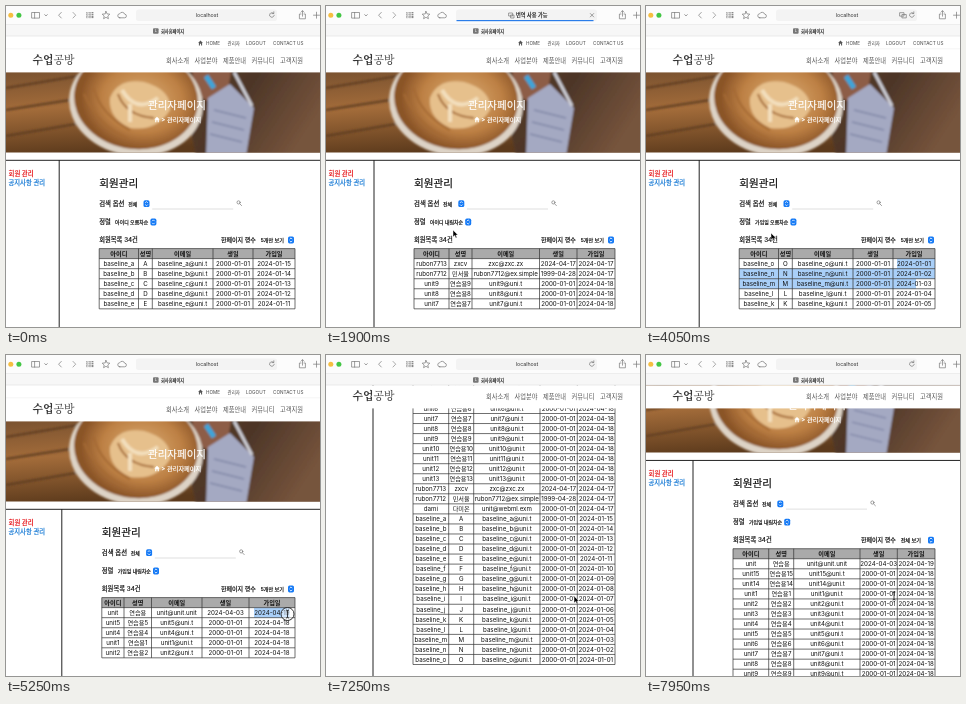
These frames come from a looping animation (314 by 321 pixels, 8 s). An HTML page:

```html
<!DOCTYPE html>
<html lang="ko">
<head>
<meta charset="utf-8">
<title>회원관리</title>
<style>
html, body { margin: 0; width: 100%; height: 100%; overflow: hidden; background: #fff; }
svg { display: block; width: 314px; height: 321px; }
text { font-family: Inter, "Noto Sans CJK KR", "Noto Sans CJK", sans-serif; white-space: pre; stroke-width: 0; }
.medium { stroke-width: .2px; }
.logo { font-family: "Noto Serif CJK KR", "Noto Sans CJK KR", serif; }
.icon { fill: none; stroke: #777; stroke-width: .7; stroke-linecap: round; stroke-linejoin: round; }
</style>
</head>
<body>
<svg viewBox="0 0 314 321">
  <defs>
    <clipPath id="heroClip"><rect y="66" width="314" height="80.5"/></clipPath>
    <linearGradient id="wood" x2=".25" y2="1">
      <stop stop-color="#7a5230"/><stop offset=".45" stop-color="#a36c3a"/><stop offset="1" stop-color="#5c3a1c"/>
    </linearGradient>
    <linearGradient id="desk" x2="1" y2=".4">
      <stop stop-color="#5a3a24"/><stop offset=".5" stop-color="#4d3628"/><stop offset="1" stop-color="#76543c"/>
    </linearGradient>
    <radialGradient id="coffee" cx=".55" cy=".5">
      <stop stop-color="#dcae74"/><stop offset=".65" stop-color="#bd8044"/><stop offset="1" stop-color="#8a5427"/>
    </radialGradient>
    <filter id="soft"><feGaussianBlur stdDeviation="1.2"/></filter>
  </defs>
  <rect width="314" height="321" fill="#fff"/>
  <g id="page">
    <g id="topNav"></g>
    <g id="hero" clip-path="url(#heroClip)">
      <rect y="66" width="314" height="81" fill="url(#wood)"/>
      <g filter="url(#soft)">
        <path d="M0 82L72 70M0 104L64 94M0 130L70 118" stroke="#5d3c20" stroke-width="2"/>
        <path d="M172 60H320V150H190Z" fill="url(#desk)"/>
        <path d="M186 60H226L222 84 204 96 188 88Z" fill="#8d5d47"/>
        <path d="M202 92L224 78 248 102 240 150H200Z" fill="#a4a9c2"/>
        <path d="M208 104L240 112M206 116L238 124M204 128L236 136" stroke="#7f86a6" stroke-width="1.5"/>
        <path d="M200 70L208 82" stroke="#3ea5da" stroke-width="5"/>
        <path d="M228 66L246 100" stroke="#cfd0d8" stroke-width="3"/>
        <ellipse cx="130" cy="97" rx="67" ry="53" fill="#ddd3c6" transform="rotate(6 130 97)"/>
        <ellipse cx="130" cy="93" rx="62" ry="50" fill="url(#coffee)" transform="rotate(6 130 93)"/>
        <path d="M104 92Q112 72 138 76 166 84 164 104 150 126 124 122 102 112 104 92Z" fill="#e6c08c"/>
        <path d="M78 88Q90 118 122 132M88 82Q94 108 124 124M112 88Q120 110 148 112" fill="none" stroke="#a56a34" stroke-width="2"/>
        <path d="M116 84Q130 108 152 92M124 98V116" fill="none" stroke="#f3dfbd" stroke-width="4"/>
      </g>
    </g>
    <g id="heroText"></g>
    <g id="sideNav"></g>
    <g id="views"></g>
  </g>
  <g id="header"></g>
  <g id="browser"></g>
  <g id="pointer">
    <circle id="ring" r="6.5" fill="#fff" fill-opacity=".45" stroke="#222" stroke-width=".9"/>
    <path id="arrow" d="M0 0V7L1.7 5.5 2.8 8 4 7.5 2.9 5.1H5Z" fill="#000" stroke="#fff" stroke-width=".5"/>
    <path id="beam" d="M-1.4-4Q0-4 0-3 0-4 1.4-4M0-3V3M-1.4 4Q0 4 0 3 0 4 1.4 4" fill="none" stroke="#111" stroke-width=".8"/>
  </g>
</svg>
<script>
const LOOP = 8000, RIGHT = 289, TABLE_TOP = 242.6, ROW = 10.04;
const $ = id => document.getElementById(id);

// Text placed by its vertical centre.
const text = (s, x, y, size, fill = '#111', extra = '') =>
  `<text x="${x}" y="${y + size * .36}" font-size="${size}" fill="${fill}" stroke="${fill}" ${extra}>${s}</text>`;
const mid = 'text-anchor="middle"', medium = 'class="medium"';
const line = (x1, y1, x2, y2, color = '#333', w = .7) =>
  `<path d="M${x1} ${y1}L${x2} ${y2}" stroke="${color}" stroke-width="${w}"/>`;
const icon = (d, extra = '') => `<path class="icon" d="${d}" ${extra}/>`;
const house = (x, y, s, fill) =>
  `<path transform="translate(${x} ${y}) scale(${s})" d="M-3 0L0-3 3 0H2V3H.7V.8H-.7V3H-2V0Z" fill="${fill}"/>`;
const stepper = (x, y) =>
  `<rect x="${x - 3}" y="${y - 3.4}" width="6" height="6.8" rx="1.6" fill="#1479f5"/>
   <path d="M${x - 1.3} ${y - .8}l1.3-1.3 1.3 1.3M${x - 1.3} ${y + .8}l1.3 1.3 1.3-1.3" fill="none" stroke="#fff" stroke-width=".8"/>`;

const unit = (n, birth = '2000-01-01', joined = '2024-04-18') =>
  ['unit' + n, '연습용' + n, `unit${n}@uni.t`, birth, joined];
const firstUnit = ['unit', '연습용', 'unit@unit.unit', '2024-04-03', '2024-04-19'];
const letter = i => {
  const c = String.fromCharCode(97 + i), id = 'baseline_' + c;
  return [id, c.toUpperCase(), id + '@uni.t', '2000-01-01', '2024-01-' + String(15 - i).padStart(2, '0')];
};
const range = n => [...Array(n).keys()];
const guests = [
  ['rubon7713', 'zxcv', 'zxc@zxc.zx', '2024-04-17', '2024-04-17'],
  ['rubon7712', '민서율', 'rubon7712@ex.simple', '1999-04-28', '2024-04-17'],
];
const letters = range(15).map(letter);
const everyone = [firstUnit, unit(15), unit(14), ...range(13).map(i => unit(i + 1)), ...guests,
  ['dami', '다미온', 'unit@webml.exm', '2000-01-01', '2024-04-17'], ...letters];

const wide = [93.2, 132.5, 146.3, 207, 247, RIGHT];
const narrow = [95.8, 118, 145.5, 196, 243, RIGHT];
const views = [
  { at: 0, cols: wide, sort: '아이디 오름차순', count: '5개만 보기', rows: letters.slice(0, 5) },
  { at: 1700, cols: [88, 123, 146, 213.5, 251, RIGHT], sort: '아이디 내림차순', count: '5개만 보기',
    rows: [...guests, unit(9), unit(8), unit(7)] },
  { at: 2950, cols: wide, sort: '가입일 오름차순', count: '5개만 보기', rows: letters.slice(10).reverse() },
  { at: 4600, cols: narrow, sort: '가입일 내림차순', count: '5개만 보기',
    rows: [firstUnit, ...[5, 4, 1, 2].map(n => unit(n))] },
  { at: 6250, cols: narrow, sort: '가입일 내림차순', count: '10개 보기',
    rows: [firstUnit, ...[10, 9, 1, 2, 3, 4, 5, 6, 7].map(n => unit(n))] },
  { at: 6920, cols: [87, 122.7, 147.7, 214, 251.3, RIGHT], sort: '가입일 내림차순', count: '전체 보기', rows: everyone },
];
const loads = [[1650, 2050], [2850, 3150], [4500, 4750], [6150, 6400], [6800, 7050]];
const notices = [[1850, 2350], [3050, 3450]];
const drags = [
  { view: 2, from: 3550, to: 3800, x: 251 },
  { view: 3, from: 5100, to: 5450, x: 248 },
];

function tableMarkup({ cols, rows }) {
  const bottom = TABLE_TOP + ROW * (rows.length + 1);
  const cells = (row, r, extra) => row.map((s, c) =>
    text(s, (cols[c] + cols[c + 1]) / 2, TABLE_TOP + ROW * (r + .5), 6.2, '#111', mid + extra)).join('');
  return `<rect x="${cols[0]}" y="${TABLE_TOP}" width="${RIGHT - cols[0]}" height="${ROW}" fill="#aaa"/>
    <g class="selection" fill="#a9cff8"></g>` +
    range(rows.length + 2).map(r => line(cols[0], TABLE_TOP + ROW * r, RIGHT, TABLE_TOP + ROW * r)).join('') +
    cols.map(x => line(x, TABLE_TOP, x, bottom)).join('') +
    cells(['아이디', '성명', '이메일', '생일', '가입일'], 0, ' font-weight="600"') +
    rows.map((row, i) => cells(row, i + 1, '')).join('');
}

function viewMarkup(view) {
  const x = view.cols[0];
  return line(x - 40, 154, x - 40, 620, '#222', 1) +
    text('회원관리', x, 177, 10.6, '#111', medium) +
    text('검색 옵션', x, 197.5, 6.4, '#111', medium) +
    text('전체', x + 29, 197.8, 4.9, '#111', medium) + stepper(x + 47.3, 197.7) +
    line(x + 53, 203, x + 134, 203, '#ccc', .6) +
    icon(`M${x + 140.6} 197.8l1.8 1.8`) + `<circle class="icon" cx="${x + 139.4}" cy="196.4" r="1.6"/>` +
    text('정렬', x, 216, 6.3, '#111', medium) +
    text(view.sort, x + 15.9, 216.2, 4.95, '#111', medium) + stepper(x + 54.2, 216) +
    text('회원목록 34건', x, 234, 6.3, '#111', medium) + text('한페이지 행수', 215, 234, 6, '#111', medium) +
    '<rect class="focus" x="252" y="229.5" width="37" height="8.6" rx="2" fill="#fff" stroke="#7db2f5" stroke-width="1.4"/>' +
    `<g class="count">${text(view.count, 254.7, 234.1, 5.1, '#111', medium)}</g>` +
    stepper(285, 234) + tableMarkup(view);
}

$('topNav').innerHTML = house(194.5, 37, .8, '#555') + text('HOME', 200, 37, 4.7, '#444') +
  text('관리자', 221.5, 37, 4.5, '#444') + text('LOGOUT', 240, 37, 4.7, '#444') +
  text('CONTACT US', 267, 37, 4.7, '#444') + line(0, 43, 314, 43, '#e8e8e8', .6);
$('heroText').innerHTML = text('관리자페이지', 171, 99, 10.5, '#fff', mid + ' ' + medium) +
  house(151, 113.5, .9, '#fff') + text('&gt; 관리자페이지', 155.2, 113.5, 6.2, '#fff', medium);
$('sideNav').innerHTML = line(0, 154.3, 314, 154.3, '#222', 1) +
  text('회원 관리', 2.5, 167.2, 6.4, '#e8262a', 'font-weight="600"') +
  text('공지사항 관리', 2.5, 177.1, 6.3, '#1478d4', medium);
$('views').innerHTML = views.map(v => `<g>${viewMarkup(v)}</g>`).join('');
$('header').innerHTML = '<rect y="43.4" width="314" height="23" fill="#fff"/>' +
  text('<tspan font-weight="700">수업</tspan><tspan>공방</tspan>', 26.5, 54.5, 10.9, '#333', 'class="logo"') +
  ['회사소개', '사업분야', '제품안내', '커뮤니티', '고객지원']
    .map((s, i) => text(s, 160 + 28.5 * i, 54.5, 6.25, '#555')).join('');

$('browser').innerHTML =
  '<rect width="314" height="30" fill="#fcfcfc"/><rect y="18.5" width="314" height="11.5" fill="#f7f7f7"/>' +
  line(0, 18.5, 314, 18.5, '#e6e6e6', .6) + line(0, 30, 314, 30, '#ddd', .6) +
  '<circle cx="4.8" cy="9.2" r="2.5" fill="#f6be40"/><circle cx="12.9" cy="9.2" r="2.5" fill="#43c645"/>' +
  icon('M26 6.5h7.5v5.6H26ZM28.6 6.5v5.6M38.7 8.6l1.3 1.4 1.3-1.4M55.3 6.4L52.6 9.2 55.3 12') +
  icon('M67 6.4L69.7 9.2 67 12', 'style="stroke:#888"') +
  range(9).map(i => `<rect x="${80.6 + i % 3 * 2.6}" y="${6.2 + Math.floor(i / 3) * 2.2}" width="1.7" height="1.3" fill="none" stroke="#888" stroke-width=".4"/>`).join('') +
  icon('M100 5.4l1.1 2.5 2.7.3-2 1.8.6 2.7-2.4-1.4-2.4 1.4.6-2.7-2-1.8 2.7-.3Z') +
  icon('M113.8 11.8h4.7a1.8 1.8 0 0 0 .2-3.6 2.7 2.7 0 0 0-5-.4 2 2 0 0 0 .1 4Z') +
  '<rect x="130" y="3.5" width="141" height="11.6" rx="2.5" fill="#f3f3f3"/>' +
  `<g id="address">${text('localhost', 201, 9.3, 5.3, '#333', mid)}</g>` +
  `<g id="notice">${text('번역 사용 가능', 190, 9.3, 5.2, '#222', medium)}${icon('M183 7h3.6v3H183ZM185 9h3v3h-3Z')}</g>` +
  `<g id="translate">${icon('M254 6.7h4v3.4h-4ZM256.3 8.5h4v3.4h-4Z')}</g>` +
  `<g id="reload">${icon('M267.5 7.3a2.3 2.3 0 1 0 .7 2M267.8 5.8v1.8H266')}</g>` +
  `<g id="stop">${icon('M264.3 7.5l3.4 3.4M267.7 7.5l-3.4 3.4')}</g>` +
  '<rect id="progress" x="130.5" y="14" height="1.2" fill="#2b7de9"/>' +
  icon('M295 8h-1.6v4.8h6V8H298M296.5 10.2V4.8M295 6.2l1.5-1.5 1.5 1.5M307.5 9.2h6M310.5 6.2v6') +
  '<rect x="147" y="22.2" width="5.6" height="5.6" rx="1" fill="#777"/>' +
  text('L', 149.8, 25, 4, '#fff', mid) + text('회사홈페이지', 155, 25, 4.2, '#333', medium);

// Keys are [time, ...values], eased between neighbours.
const smooth = p => p * p * (3 - 2 * p);
function track(keys, t) {
  const i = keys.findIndex(k => k[0] > t);
  if (i < 0) return keys[keys.length - 1].slice(1);
  if (i === 0) return keys[0].slice(1);
  const [a, b] = [keys[i - 1], keys[i]];
  const p = smooth((t - a[0]) / (b[0] - a[0]));
  return a.slice(1).map((v, n) => v + (b[n + 1] - v) * p);
}
const pointerPath = [
  [50, 318, 160], [700, 128, 216], [1000, 127, 216], [1500, 127, 224], [2500, 127, 224],
  [2800, 125, 226], [3250, 125, 226], [3550, 251, 258], [3800, 268, 279], [4050, 125, 227],
  [4350, 126, 224], [4750, 126, 226], [5100, 248, 259], [5250, 281.5, 259],
  [5430, 284, 269], [5850, 284, 234], [6500, 275, 234], [6750, 252, 240.5],
  [7050, 252, 240.5], [7250, 248, 241], [7950, 248, 241],
];
const scrollPath = [[6960, 0], [7240, 284.5], [7350, 284.5], [8000, 45]];

const within = (t, [a, b]) => t >= a && t < b;
const show = (el, on) => { el.style.display = on ? '' : 'none'; };
const viewEls = [...$('views').children];

function drawSelection(index, t) {
  const drag = drags.find(d => d.view === index);
  if (!drag) return;
  let bars = '';
  if (t >= drag.from) {
    const [x, y] = track(pointerPath, Math.min(t, drag.to));
    const { cols } = views[index];
    const last = Math.max(0, Math.floor((y - TABLE_TOP) / ROW) - 1);
    bars = range(last + 1).map(r => {
      const left = r ? cols[0] : drag.x, right = r < last ? RIGHT : x + 2;
      return `<rect x="${left}" y="${TABLE_TOP + ROW * (r + 1)}" width="${Math.max(0, right - left)}" height="${ROW}"/>`;
    }).join('');
  }
  viewEls[index].querySelector('.selection').innerHTML = bars;
}

function draw(t) {
  const current = views.filter(v => v.at <= t).length - 1;
  viewEls.forEach((el, i) => {
    show(el, i === current);
    show(el.querySelector('.focus'), i === 4 && t >= 6750);
  });
  viewEls[4].querySelector('.count text').textContent = t >= 6750 ? '전체 보기' : '10개 보기';
  drawSelection(current, t);

  const [scroll] = track(scrollPath, t);
  $('page').setAttribute('transform', `translate(0 ${-scroll})`);
  $('header').setAttribute('transform', `translate(0 ${-Math.min(13, scroll)})`);

  const load = loads.find(l => within(t, l));
  const notice = notices.some(n => within(t, n));
  show($('stop'), load);
  show($('reload'), !load);
  show($('notice'), notice);
  show($('address'), !notice);
  show($('translate'), !load && !notice && (current === 1 || current === 2));
  const part = load ? (t - load[0]) / (load[1] - load[0]) : 0;
  $('progress').setAttribute('width', load ? 137 * Math.min(1, .05 + smooth(Math.max(0, part - .2) / .8) * 1.9) : 0);

  const [x, y] = track(pointerPath, t);
  const pressed = drags.some(d => within(t, [d.from, d.to]));
  const beam = pressed || within(t, [5050, 5500]) || t >= 7600;
  $('pointer').setAttribute('transform', `translate(${x} ${y})`);
  show($('ring'), pressed);
  show($('beam'), beam);
  show($('arrow'), !beam);
}

function tick() {
  draw(performance.now() % LOOP);
  requestAnimationFrame(tick);
}
tick();
</script>
</body>
</html>
```
